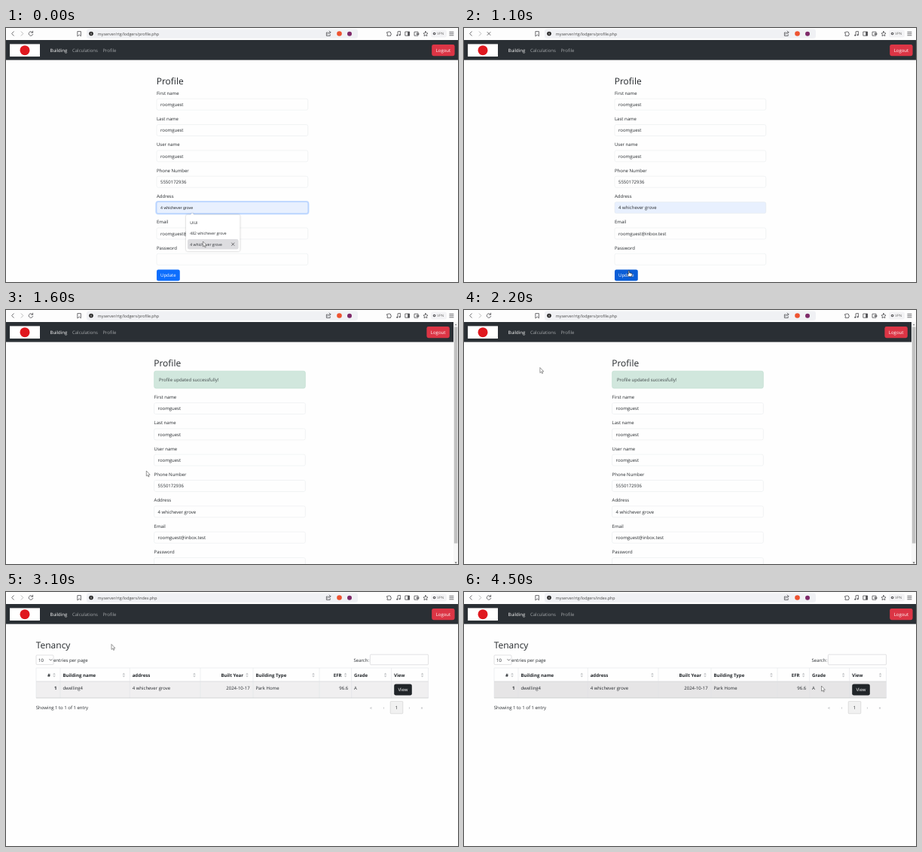
Recreate the animation shown at these times as an HTML page. Size 600 px wide and 338 px high, loop 4.6 s.

```html
<!DOCTYPE html>
<html lang="en">
<head>
<meta charset="utf-8">
<title>Tenancy portal</title>
<style>
  html, body { margin: 0; width: 100%; height: 100%; overflow: hidden; background: #fefefe; }
  svg { display: block; width: 100%; height: 100%; }
  text { font-family: "Open Sans", "Noto Sans", sans-serif; font-size: 6px; fill: #24282c;
         text-rendering: geometricPrecision; white-space: pre; }
  .arial { font-family: "Liberation Sans", Arial, sans-serif; font-size: 5.33px; }
  .h { font-size: 12px; font-weight: 500; }
  .b { font-size: 6.1px; font-weight: 700; }
  .w { fill: #fff; }
  .dim { fill: #a3a6a9; }
  .end { text-anchor: end; }
  .mid { text-anchor: middle; }
  .url { font-size: 5.3px; fill: #444; }
  .item { font-size: 5.05px; }
  .small { font-size: 4.6px; fill: #666; }
  .icon { fill: none; stroke: #4c4c50; stroke-width: .8; stroke-linecap: round; stroke-linejoin: round; }
  .pale { stroke: #aaa; }
</style>
</head>
<body>
<svg id="stage" viewBox="0 0 600 338"></svg>
<script>
const LOOP = 4600, STEP = 100;
const USER = 'roomguest', PHONE = '5550172936', STREET = 'whichever grove';
const ADDRESS = '4 ' + STREET, EMAIL = USER + '@inbox.test';
const SITE = 'myserver/rtg/lodgers/';

// Times of the hard changes, in ms
const PICKED = 200, SUBMIT = 900, UPDATED = 1200, LINK = 2600, INDEX = 2900;

// Pointer track: time, x, y
const TRACK = [
  [0, 261.5, 284], [200, 261.5, 284], [700, 216, 322], [1200, 216, 322],
  [1600, 186.3, 214], [1800, 186.3, 214], [2400, 71, 28.5], [2700, 71, 28.5],
  [3000, 140, 69.5], [3100, 140, 69.5], [3600, 118, 123], [3900, 64, 121],
  [4200, 331, 121], [4500, 474.5, 125]
];

const text = (x, y, s, cls = '') => `<text x="${x}" y="${y}" class="${cls}">${s}</text>`;
const rect = (x, y, w, h, fill, r = 0, stroke = 'none', sw = .4) =>
  `<rect x="${x}" y="${y}" width="${w}" height="${h}" rx="${r}" fill="${fill}" stroke="${stroke}" stroke-width="${sw}"/>`;
const icon = (d, cls = '') => `<path d="${d}" class="icon ${cls}"/>`;
const shape = (d, fill) => `<path d="${d}" fill="${fill}"/>`;
const dot = (x, y, r, fill) => `<circle cx="${x}" cy="${y}" r="${r}" fill="${fill}"/>`;
const line = (x1, y1, x2, y2, color, w = .5) =>
  `<path d="M${x1} ${y1}L${x2} ${y2}" stroke="${color}" stroke-width="${w}"/>`;

function pointerAt(t) {
  const i = TRACK.findIndex(k => k[0] > t);
  if (i < 0) return TRACK.at(-1).slice(1);
  const [t0, x0, y0] = TRACK[i - 1], [t1, x1, y1] = TRACK[i];
  const p = (t - t0) / (t1 - t0), e = p * p * (3 - 2 * p);
  return [x0 + (x1 - x0) * e, y0 + (y1 - y0) * e];
}

function browserBar(page, loading) {
  return rect(0, 0, 600, 16, '#fdfdfd') +
    icon('M10.2 4.8L7.6 7.5L10.2 10.2') +
    icon('M20.2 4.8L22.8 7.5L20.2 10.2', 'pale') +
    (loading
      ? icon('M31 5.5L35 9.5M35 5.5L31 9.5')
      : icon('M35.4 6A2.8 2.8 0 1 0 35.7 8.4M35.6 4.2V6.2H33.6')) +
    icon('M95.2 4.6H99.4V10.8L97.3 9L95.2 10.8Z') +
    rect(107, 1.5, 360, 12.2, '#f0f1f4', 3) +
    dot(113, 7.5, 2.8, '#222') + rect(112.6, 6.9, .8, 2.2, '#fff') + rect(112.6, 5.6, .8, .8, '#fff') +
    text(121.8, 9.6, SITE + page, 'url') +
    icon('M427 6H425.4V10.4H430.2V8.6M427 8.4C427.2 6.4 428.4 5.8 430.8 5.8M429.2 4L431 5.8L429.2 7.6') +
    dot(442.5, 7.5, 3.3, '#ee5330') + dot(456, 7.7, 3, '#7e2a69') +
    icon('M506 5.6H507.6A.9 .9 0 0 1 509.4 5.6H510.6V7.2A.9 .9 0 0 1 510.6 9V10.4H506V8.8A.8 .8 0 0 0 506 7.2Z') +
    icon('M520 9.6V4.8L523.4 4.4V9') + dot(519.2, 9.7, 1, '#4c4c50') + dot(522.6, 9.2, 1, '#4c4c50') +
    icon('M530.2 5H535.6V10.2H530.2Z') + rect(533.2, 5, 2.5, 5.2, '#4c4c50') +
    icon('M542.4 5.2H547V10.2H542.4ZM545.4 7.2H548V8.6H545.4Z') +
    icon('M557 4.4L558 6.7L560 7L558.5 8.6L558.9 10.6L557 9.6L555 10.6L555.4 8.6L554 7L556 6.7Z') +
    rect(564, 2.5, 21, 10, '#f3f3f5', 3) + dot(568.6, 7.5, 1.8, '#4c4c50') + dot(568.6, 7.5, .7, '#fff') +
    text(572.2, 9.2, 'VPN', 'small') +
    icon('M588.8 5.4H594M588.8 7.6H594M588.8 9.8H594');
}

function navbar(shift) {
  const x = 565.2 - shift;
  return rect(0, 16, 600, 26.6, '#2a2f34') +
    rect(5, 21.4, 40, 16.6, '#fff') + dot(25, 29.7, 6.5, '#e0181f') +
    text(58.5, 32, 'Building', 'b w').replace('b w', 'w" font-weight="500') +
    text(88, 32, 'Calculations', 'dim') + text(128.4, 32, 'Profile', 'dim') +
    rect(x, 22, 30.4, 15.2, '#dc3545', 2.4) +
    text(x + 15.2, 31.9, 'Logout', 'w mid');
}

function form(x, top, t) {
  const fields = [
    ['First name', USER], ['Last name', USER], ['User name', USER],
    ['Phone Number', PHONE], ['Address', ADDRESS], ['Email', EMAIL], ['Password', '']
  ];
  return fields.map(([label, value], i) => {
    const y = top + i * 34.35, address = i === 4 && t < UPDATED, focus = address && t < SUBMIT;
    const preview = address && t < PICKED;
    return text(x, y + 2.2, label) +
      (focus ? rect(x - .8, y + 6.9, 202.4, 16.6, 'none', 3, '#bfd8ff', 1.6) : '') +
      rect(x, y + 7.7, 200.8, 15, address ? '#e8f0fe' : '#fefefe', 2.2, focus ? '#86b7fe' : '#dee2e6') +
      text(x + 5, y + (preview ? 17 : 17.5), value, preview ? 'arial' : '');
  }).join('');
}

function suggestions() {
  return '<g filter="drop-shadow(0 .6px 1px #0004)">' + rect(239, 248.5, 71.5, 48.5, '#fff', 2) +
    shape('M244.5 248.7L247.2 246.2L250 248.7Z', '#fff') + '</g>' +
    rect(241, 281, 67.6, 13.6, '#dddde0', 2.4) +
    ['UIUI', '482 ' + STREET, ADDRESS].map((s, i) => text(244.3, 260.7 + i * 14.5, s, 'item')).join('') +
    icon('M299.6 286L303 289.4M303 286L299.6 289.4');
}

function editPage(t, hover) {
  return text(199.7, 75.2, 'Profile', 'h') + form(200, 86.5, t) +
    rect(200, 321.4, 30.8, 15.2, hover && t > 700 ? '#0b5ed7' : '#0d6efd', 2.4) +
    text(215.3, 331.3, 'Update', 'w mid') +
    (t < PICKED ? suggestions() : '');
}

function updatedPage(t) {
  return text(196.2, 75.2, 'Profile', 'h') +
    rect(196.6, 81.2, 200.8, 23, '#d1e7dd', 2.4, '#a9d2bf') +
    `<g opacity=".85">${text(203, 95.2, 'Profile updated successfully!')}</g>` +
    form(196.6, 115.8, t) +
    rect(594, 16, 6, 322, '#f7f7f7') + rect(594.8, 22.5, 4.6, 288, '#c1c1c1') +
    shape('M595.6 20.3L597.1 18.4L598.6 20.3Z', '#777') +
    shape('M595.6 335.6L597.1 337.4L598.6 335.6Z', '#555') +
    (t >= LINK ? rect(0, 331.6, 73, 6.4, '#dcdee1', 1) + text(1.8, 336.7, SITE + 'index.php', 'small') : '');
}

function indexPage(hover) {
  const edge = '#dfe1e4';
  // Left edge, right edge, heading, value, right-aligned
  const columns = [
    [40, 72, '#', '1', 1], [72, 164.3, 'Building name', 'dwelling4'], [164.3, 258, 'address', ADDRESS],
    [258, 328, 'Built Year', '2024-10-17', 1], [328, 416, 'Building Type', 'Park Home'],
    [416, 458.6, 'EFR', '96.6', 1], [458.6, 511.6, 'Grade', 'A'], [511.6, 560.6, 'View', '']
  ];
  const cells = columns.map(([l, r, head, value, right], i) =>
    line(r, 101, r, 141, edge) +
    (right ? text(r - 13, 112.7, head, 'b end') : text(l + 3.4, 112.7, head, 'b')) +
    (right ? text(r - 4.4, 130.2, value, i ? 'end' : 'b end') : text(l + 3.4, 130.2, value)) +
    shape(`M${r - 9.8} 110L${r - 8} 107.6L${r - 6.2} 110ZM${r - 9.8} 111.2L${r - 8} 113.6L${r - 6.2} 111.2Z`, '#c6c8ca')
  ).join('');
  return text(39.7, 75.2, 'Tenancy', 'h') +
    rect(40, 84, 23, 12.6, '#fefefe', 1.2, '#b5b7ba') + text(43, 92.7, '10') +
    icon('M57.8 89.6L59.4 91.2L61 89.6') + text(63, 92.7, 'entries per page') +
    text(482, 92.7, 'Search:', 'end') + rect(483.4, 83.2, 77.2, 13.6, '#fefefe', 1.2, '#b5b7ba') +
    rect(40, 119, 520.6, 22, hover ? '#e6e5e6' : '#f0eff0') +
    line(40, 101, 560.6, 101, edge) + line(40, 119, 560.6, 119, '#c5c7c9') +
    line(40, 101, 40, 141, edge) + cells + line(40, 141, 560.6, 141, '#b3b5b7') +
    rect(515.2, 122.4, 23.6, 15.2, '#212529', 2.4) + text(527, 132.3, 'View', 'w mid') +
    text(39.8, 156.2, 'Showing 1 to 1 of 1 entry') +
    rect(510.2, 145.6, 16.6, 16.2, '#f1f1f1', .8, '#b9b9b9') + text(518.5, 156, '1', 'mid') +
    [[484.4, '«'], [501.4, '‹'], [535.4, '›'], [552, '»']].map(([x, s]) => text(x, 155.8, s, 'dim mid')).join('');
}

function pointer(x, y, hand) {
  const d = hand
    ? 'M2.2 4.8V1.2Q2.9 .1 3.6 1.2V3.8L6.4 4.4Q7.3 4.7 7.2 5.6L6.6 8.8H3L.7 6.2Q.6 5.1 1.5 5.3L2.2 6Z'
    : 'M0 0V7L1.6 5.6L2.7 8L3.8 7.5L2.7 5.2H4.9Z';
  return `<path d="${d}" transform="translate(${x} ${y})" fill="#fff" stroke="${hand ? '#111' : '#555'}" stroke-width=".6" stroke-linejoin="round"/>`;
}

function draw(t) {
  const [x, y] = pointerAt(t);
  const editing = t < UPDATED, index = t >= INDEX;
  const onButton = editing && x < 231 && y > 320;
  const onLink = !index && y < 36 && x < 84;
  const loading = (t >= 1000 && editing) || (t >= LINK && !index);
  const page = index ? indexPage(y > 119) : editing ? editPage(t, onButton) : updatedPage(t);
  stage.innerHTML = rect(0, 0, 600, 338, '#fefefe') +
    browserBar(index ? 'index.php' : 'profile.php', loading) +
    navbar(editing || index ? 0 : 6.8) + page + pointer(x, y, onButton || onLink);
}

const stage = document.getElementById('stage');
const start = performance.now();
let shown = -1;
function tick() {
  const t = Math.floor((performance.now() - start) % LOOP / STEP) * STEP;
  if (t !== shown) draw(shown = t);
  requestAnimationFrame(tick);
}
tick();
</script>
</body>
</html>
```
